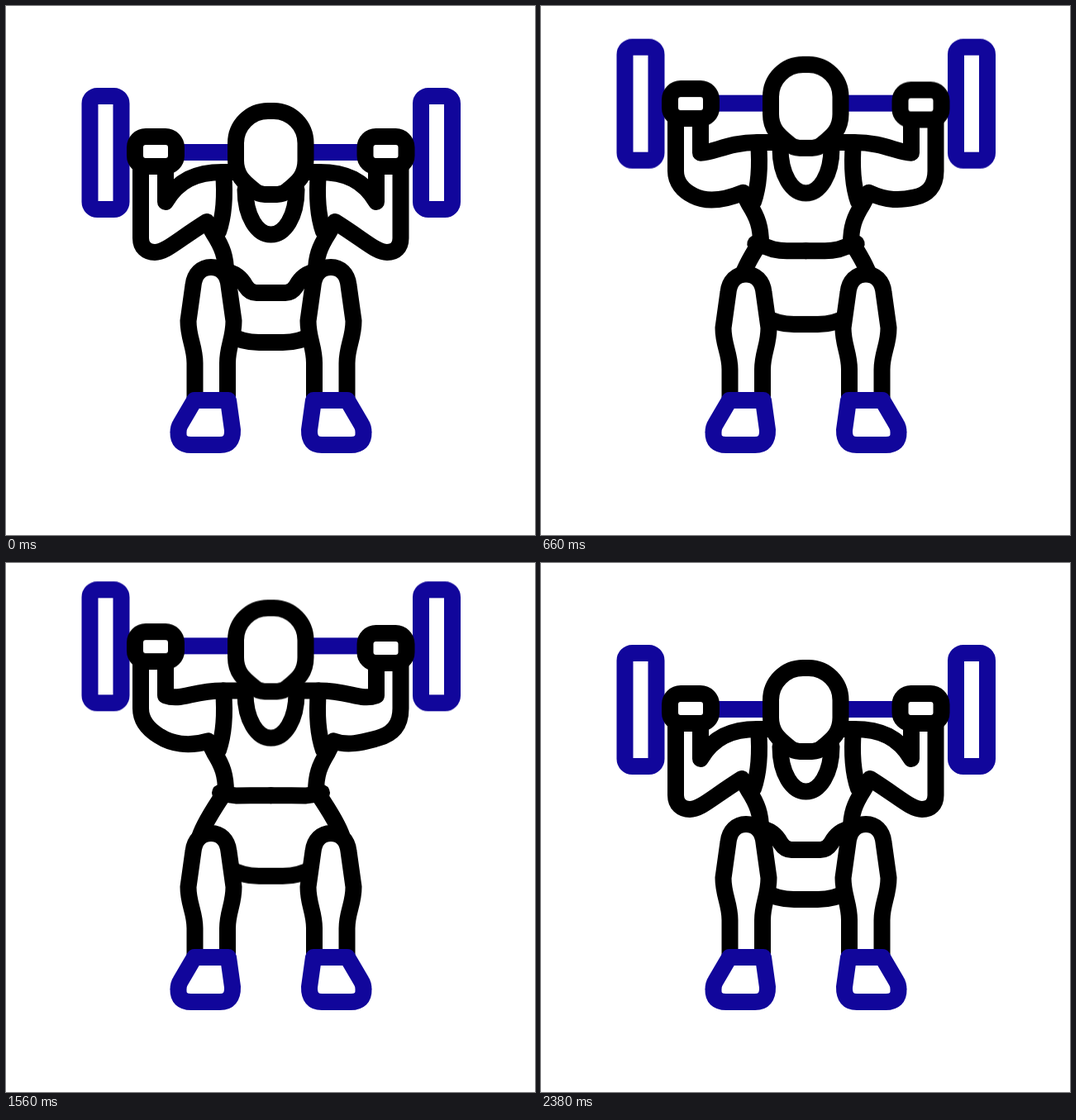
Recreate the animation shown at these times as an HTML page without scripts. Size 640 px wide and 640 px high, loop 2.4 s.

```html
<!DOCTYPE html>
<html lang="en">
<head>
<meta charset="utf-8">
<title>Barbell squat</title>
<style>
  html, body { margin: 0; width: 100%; height: 100%; overflow: hidden; background: #fff; }
  svg { display: block; width: 100vw; height: 100vh; }
  svg * { stroke-width: 20px; stroke-linecap: round; stroke-linejoin: round; }
  .line { fill: none; stroke: #000; }
  .solid { fill: #fff; stroke: #000; }
  .blue { fill: #fff; stroke: #11069b; }

  /* .rise moves a part up by --up, .bend morphs it from --low to --high */
  .rise, .bend { animation: 2.4s cubic-bezier(.78, 0, .22, 1) infinite; }
  .rise { animation-name: rise; }
  .bend { animation-name: bend; d: var(--low); }
  @keyframes rise {
    0%, 99.4%, 100% { transform: translateY(0); }
    49.7% { transform: translateY(var(--up)); }
  }
  @keyframes bend {
    0%, 99.4%, 100% { d: var(--low); }
    49.7% { d: var(--high); }
  }

  .thigh {
    --low: path("M264 320 Q266 324 270 330");
    --high: path("M263 276 Q237 314 231 331");
  }
  .belt {
    --low: path("M260 320 C278 322 285 330 290 339 Q295 347 303 347 H321");
    --high: path("M259 274 C262 276 270 276 278 276 Q286 275 295 275 H321");
  }
  .shoulder {
    --low: path("M193 195 V237 C208 211 230 201 262 201 H285");
    --high: path("M193 112 V153 C212 163 225 150 262 150 H285");
  }
  .side {
    --low: path("M263 201 C265 225 265 250 257 273");
    --high: path("M263 150 C265 174 265 199 257 222");
  }
  .left-arm {
    --low: path("M163 195 V281 C163 292 170 298 180 298 C193 298 205 285 243 261 L251 275 C262 292 266 304 266 322");
    --high: path("M163 112 V166 C163 180 172 192 186 201 C200 211 222 217 245 211 L252 225 C262 241 266 252 266 273");
  }
  .right-arm {
    --low: path("M477.5 195 V281 C477.5 292 471 298 461 298 C448 298 436 285 398 261 L390 275 C379 292 375 304 375 322");
    --high: path("M477.5 112 V166 C477.5 188 466 199 448 204 C430 209 412 216 396 211 L389 225 C379 241 375 252 375 273");
  }
  .leg {
    stroke-linecap: butt;
    --low: path("M228.5 474 V432 C228.5 412 220.5 402 220.5 381 L226.5 338 C228 324 237 316 248 316 C259 316 268 324 269.5 338 L275.5 381 C275.5 402 268 412 268 432 V474");
    --high: path("M228.5 474 V443 C228.5 423 220.5 414 220.5 393 L226.5 350 C228 336 237 328 248 328 C259 328 268 336 269.5 350 L275.5 393 C275.5 414 268 423 268 443 V474");
  }
  .shoe { d: path("M228 477 H269 L274 513 Q274.5 531 259 531 H224 Q208 531 208.5 516 Q208.5 510 211 506 Z"); }
</style>
</head>
<body>
<svg viewBox="0 0 640 640">
  <g class="blue rise" style="--up:-84px">
    <rect x="101.5" y="109" width="38" height="137" rx="9"/>
    <rect x="502" y="109" width="38" height="137" rx="9"/>
    <path d="M210 177 H430"/>
  </g>

  <g class="line">
    <path class="bend thigh"/>
    <path class="bend belt"/>
    <path class="bend shoulder"/>
    <path class="bend side"/>
  </g>
  <g class="line" transform="matrix(-1 0 0 1 641 0)">
    <path class="bend thigh"/>
    <path class="bend belt"/>
    <path class="bend shoulder"/>
    <path class="bend side"/>
  </g>
  <path class="line rise" style="--up:-31px" d="M268 397 Q286 407 306 407 H335 Q355 407 373 397"/>
  <path class="line bend left-arm"/>
  <path class="line bend right-arm"/>

  <rect class="solid rise" style="--up:-82px" x="156" y="158" width="50" height="36" rx="13"/>
  <rect class="solid rise" style="--up:-80px" x="434.5" y="158" width="50" height="36" rx="13"/>

  <path class="line rise" style="--up:-71px" d="M289.5 222 C289.5 255 304 276.5 320.5 276.5 S351.5 255 351.5 222"/>
  <path class="solid rise" style="--up:-79.5px" d="M278 166 A39 39 0 0 1 317 127 H324 A39 39 0 0 1 362.5 166 V187 C362.5 205 353 213 342 222 Q336 228 328 228 H313 Q305 228 299 222 C288 213 278 205 278 187 Z"/>

  <g>
    <path class="solid bend leg"/>
    <path class="blue shoe"/>
  </g>
  <g transform="matrix(-1 0 0 1 641 0)">
    <path class="solid bend leg"/>
    <path class="blue shoe"/>
  </g>
</svg>
</body>
</html>
```
